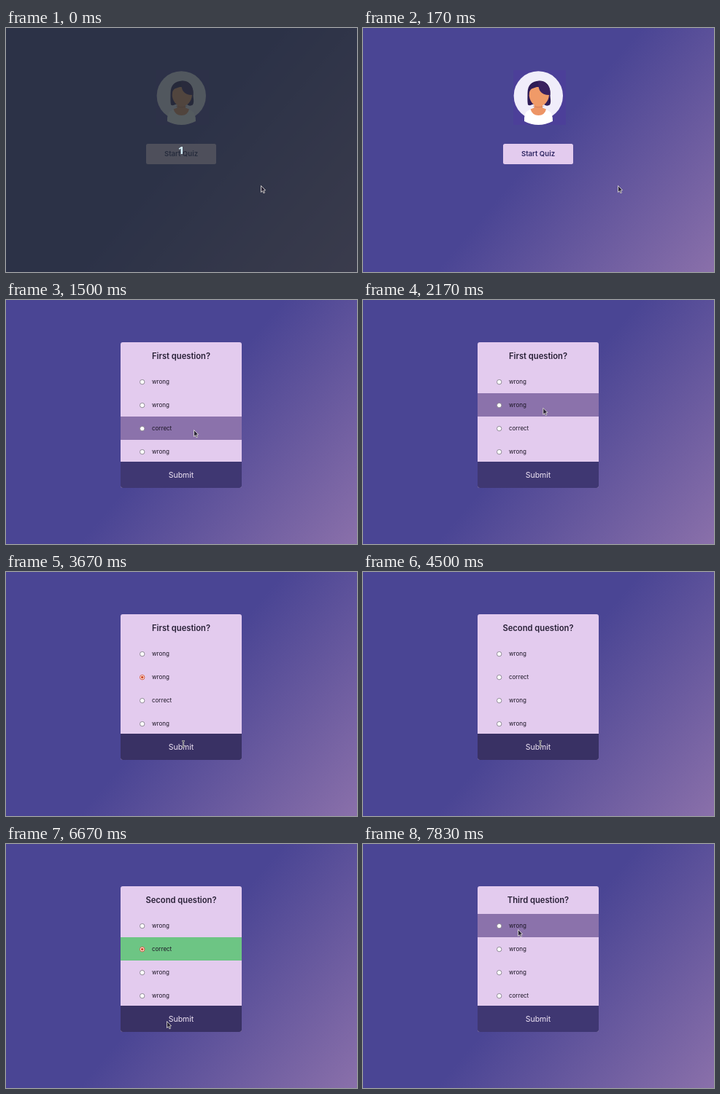
Write an HTML page that moves like this. It is 481 px wide and 335 px high and loops after 8 s.

```html
<!DOCTYPE html>
<html lang="en">
<head>
<meta charset="utf-8">
<title>Quiz</title>
<style>
  html, body { margin: 0; width: 100%; height: 100%; overflow: hidden; background: #4a4594; }
  svg { display: block; width: 100%; height: 100%; }
  text { font-family: Inter, sans-serif; }
  .mid { text-anchor: middle; }
</style>
</head>
<body>
<svg viewBox="0 0 481 335" preserveAspectRatio="none">
  <defs>
    <linearGradient id="sky" gradientUnits="userSpaceOnUse" x1="240.5" y1="167.5" x2="464.2" y2="355.2">
      <stop offset="0" stop-color="#4a4594"/>
      <stop offset="1" stop-color="#8a70aa"/>
    </linearGradient>
    <clipPath id="round"><rect x="157" y="58" width="166" height="200" rx="3"/></clipPath>
  </defs>
  <rect width="481" height="335" fill="url(#sky)"/>

  <g id="intro">
    <rect x="206" y="58" width="72" height="75" fill="#4c3f99"/>
    <circle cx="240.3" cy="93" r="33.7" fill="#f0edfa"/>
    <path d="M226 105.500C225 100 225.500 95 225.500 89C225.500 78 232 73 241 72.500C251 72 257 80 256.500 90C256.200 96 258.500 101 256 105.500Q252 108 248 105H232Q229 107 226 105.500Z" fill="#2f1c57"/>
    <path d="M221 128Q220.500 116 226 113.500L233 110H247L254 113.500Q260 116 260 128Q250 133 240.500 133Q230 133 221 128Z" fill="#fff"/>
    <path d="M234.500 104H246V109.500L251 111.500Q249 120 240.500 120Q232 120 229.500 111.500L234.500 109.500Z" fill="#ed9565"/>
    <path d="M227.500 91Q227 83 234 81H248Q255.500 83 255 92C254.500 101 248 107.500 241 107.500S228 101 227.500 91Z" fill="#f09a68"/>
    <path d="M233 107Q240.500 110.500 248 107" fill="none" stroke="#a85a48" stroke-width=".8" stroke-dasharray="1 1"/>
    <path d="M226 92C226 80 232 74 241 73Q242.500 78 239.500 80.500Q235 82 231 83.500Q227.500 86 227.500 92Z" fill="#2f1c57"/>
    <path d="M240 73C251 71 258 81 256.500 92Q247 92.500 243 87Q240 83 240 73Z" fill="#3a205f"/>
    <rect id="start" x="192" y="159" width="96" height="28" rx="2.500"/>
    <text class="mid" x="240" y="176.300" font-size="9.600" font-weight="600" fill="#2f2763">Start Quiz</text>
  </g>

  <g id="card">
    <g clip-path="url(#round)">
      <rect x="157" y="58" width="166" height="200" fill="#e3cbee"/>
      <g id="rows"></g>
      <rect id="submit" x="157" y="222" width="166" height="36"/>
    </g>
    <text id="title" class="mid" x="240" y="81" font-size="11.200" font-weight="600" fill="#282036"></text>
    <text class="mid" x="240" y="244" font-size="10.500" fill="#f1e6f6">Submit</text>
  </g>

  <g id="count">
    <rect width="481" height="335" fill="#242d32" opacity=".78"/>
    <text class="mid" x="240" y="173" font-size="15" font-weight="600" fill="#d8f5ff" style="font-family:'Noto Sans',sans-serif">1</text>
  </g>

  <g id="cursor">
    <path id="arrow" d="M.5 .5V9.500L2.600 7.700L4 10.800L5.500 10.100L4.100 7.100L6.600 6.700Z" fill="#2b2638" stroke="#ebe7e3" stroke-width=".8"/>
    <g id="beam" fill="none">
      <path d="M-2 -4H2M0 -4V4M-2 4H2" stroke="#fff" stroke-width="2.200"/>
      <path d="M-2 -4H2M0 -4V4M-2 4H2" stroke="#2b2638" stroke-width="1"/>
    </g>
  </g>
</svg>
<script>
const $ = id => document.getElementById(id);
const LOOP = 8000, TICK = 1000 / 6;
const CARD = 9, W = 'wrong', C = 'correct';

// Ticks: shown from, option picked, answer revealed
const questions = [
  { name: 'First', from: CARD, pick: 16, reveal: 23, answers: [W, W, C, W] },
  { name: 'Second', from: 27, pick: 33, reveal: 40, answers: [W, C, W, W] },
  { name: 'Third', from: 43, pick: 99, reveal: 99, answers: [W, W, W, C] }
];
const PICKED = 1;

// Pointer moves: first tick, last tick, x, y
const moves = [
  [4, 8, 257, 178], [12, 14, 245, 144], [18, 22, 243, 236], [29, 31, 230, 148],
  [36, 39, 221, 251], [40, 40, 220, 243], [45, 47, 212, 117]
];

function make(parent, tag, attrs) {
  const el = document.createElementNS('http://www.w3.org/2000/svg', tag);
  for (const key in attrs) el.setAttribute(key, attrs[key]);
  return parent.appendChild(el);
}

const rows = [0, 1, 2, 3].map(i => {
  const g = make($('rows'), 'g', { transform: `translate(157 ${96 + 32 * i})` });
  return {
    bar: make(g, 'rect', { width: 166, height: 32 }),
    ring: make(g, 'circle', { cx: 29.7, cy: 16.6, r: 3.2, fill: '#fff', 'stroke-width': 0.9 }),
    dot: make(g, 'circle', { cx: 29.7, cy: 16.6, r: 1.8, fill: '#d2492a' }),
    label: make(g, 'text', { x: 43, y: 18.8, 'font-size': 8, fill: '#1b1524' })
  };
});

function pointer(k) {
  let x = 349, y = 216;
  for (const [a, b, tx, ty] of moves) {
    if (k < a) break;
    const p = Math.min(1, (k - a + 1) / (b - a + 1));
    const e = p * (2 - p);
    x += (tx - x) * e;
    y += (ty - y) * e;
  }
  return { x, y };
}

const within = (p, x0, y0, x1, y1) => p.x >= x0 && p.x < x1 && p.y >= y0 && p.y < y1;
const show = (id, on) => $(id).setAttribute('display', on ? 'inline' : 'none');
const fill = (el, color) => el.setAttribute('fill', color);

function drawCard(k, p) {
  const q = questions.filter(item => k >= item.from).pop();
  $('title').textContent = q.name + ' question?';
  fill($('submit'), within(p, 157, 222, 323, 258) ? '#393164' : '#3f3772');
  rows.forEach((row, i) => {
    const top = 96 + 32 * i;
    const checked = i === PICKED && k >= q.pick;
    let color = within(p, 157, top, 323, top + 32) ? '#8b72ab' : '#e3cbee';
    if (checked && k >= q.reveal) color = q.answers[i] === C ? '#6dc584' : '#df6a6a';
    fill(row.bar, color);
    row.ring.setAttribute('stroke', checked ? '#d2492a' : '#85808c');
    row.dot.setAttribute('display', checked ? 'inline' : 'none');
    row.label.textContent = q.answers[i];
  });
}

function draw(t) {
  const k = Math.floor((t + 3.4) / TICK);
  const p = pointer(k);
  const quiz = k >= CARD;
  show('count', k < 1);
  show('intro', !quiz);
  show('card', quiz);
  if (quiz) drawCard(k, p);
  fill($('start'), within(p, 192, 159, 288, 187) ? '#fff' : '#e3cbee');

  const overText = quiz ? within(p, 223, 232, 258, 248) : within(p, 217, 167, 264, 181);
  show('arrow', !overText);
  show('beam', overText);
  $('cursor').setAttribute('transform', `translate(${p.x} ${p.y})`);
}

function loop() {
  draw(performance.now() % LOOP);
  requestAnimationFrame(loop);
}
loop();
</script>
</body>
</html>
```
